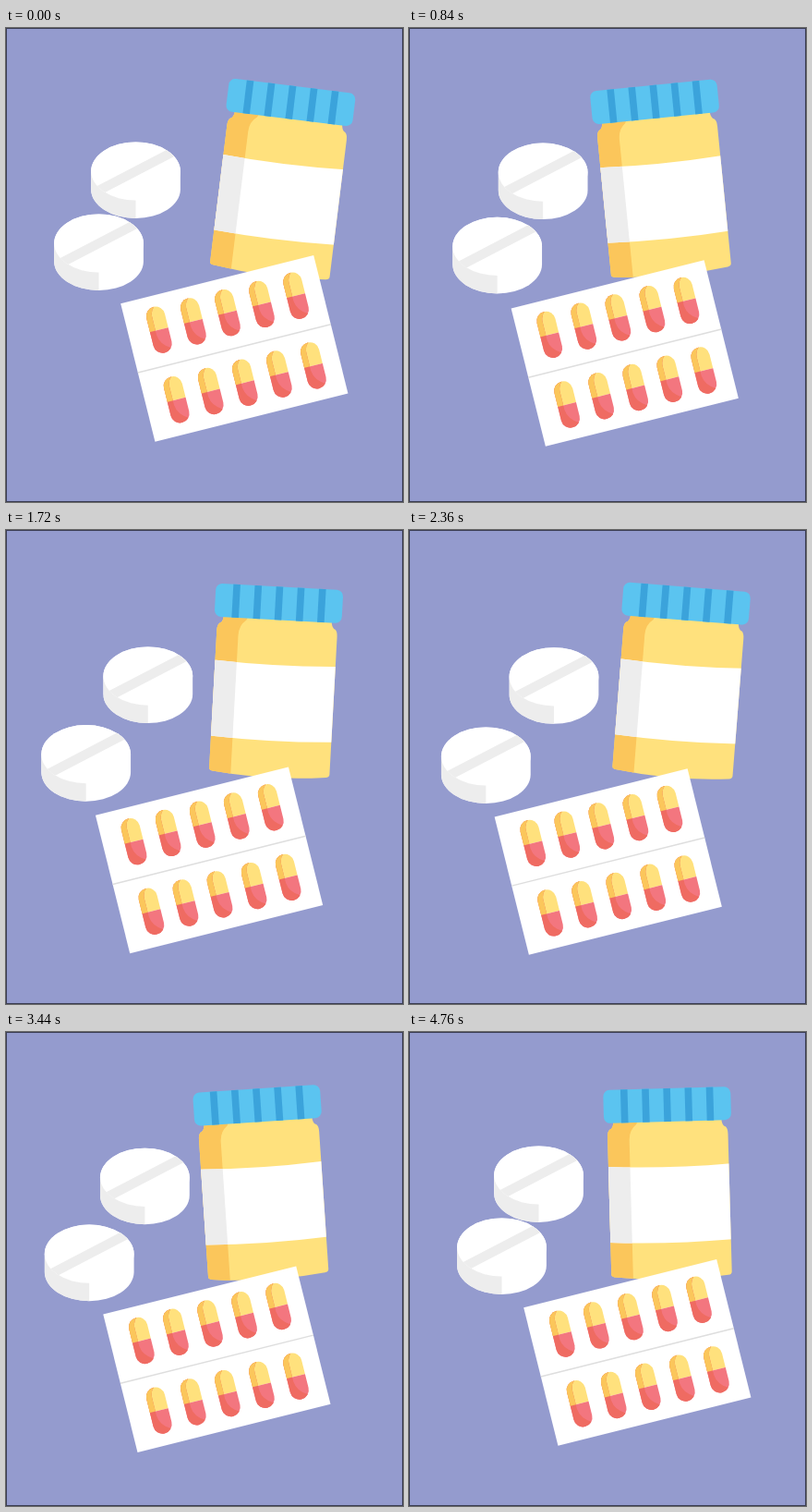
Animation, 430 px wide and 513 px high, one loop 4800 ms. Source, as an HTML page with a canvas:

```html
<!DOCTYPE html>
<html lang="en">
<head>
<meta charset="utf-8">
<title>Medicine</title>
<style>
  html, body { margin: 0; width: 100%; height: 100%; overflow: hidden; background: #949bce; }
  canvas { display: block; }
</style>
</head>
<body>
<canvas id="stage"></canvas>
<script>
const W = 430, H = 513, LOOP = 4800, STEP = 40, RAD = Math.PI / 180;
const canvas = document.getElementById('stage');
const ctx = canvas.getContext('2d');
const scale = window.devicePixelRatio || 1;
canvas.width = W * scale;
canvas.height = H * scale;
canvas.style.width = W + 'px';
canvas.style.height = H + 'px';

const C = {
  bg: '#949bce', border: '#3b3e55', white: '#ffffff', gray: '#ededed', line: '#dedede',
  cap: '#5bc4f0', stripe: '#3ba3db', yellow: '#ffe17d', amber: '#fbc65b',
  pink: '#f3767f', red: '#ef6b62'
};

const smooth = p => p * p * (3 - 2 * p);
const settle = p => p * (1 - p) ** 2 + 3 * (1 - p) * p * p + p ** 3;

// 0 -> 1 -> 0 over one loop
function backAndForth(t, easeOut) {
  const p = t / (LOOP / 2);
  return p < 1 ? easeOut(p) : 1 - smooth(p - 1);
}

function swing(t) {
  const half = 1040, n = Math.floor(t / half);
  const value = 1 - 2 * smooth(t / half - n);
  return 7.05 * RAD * (n % 2 ? -value : value);
}

function placed(x, y, angle, draw) {
  ctx.save();
  ctx.translate(x, y);
  ctx.rotate(angle);
  draw();
  ctx.restore();
}

function rect(color, x, y, w, h) {
  ctx.fillStyle = color;
  ctx.fillRect(x, y, w, h);
}

function fill(color, path) {
  ctx.fillStyle = color;
  ctx.beginPath();
  path();
  ctx.fill();
}

function clip(path) {
  ctx.beginPath();
  path();
  ctx.clip();
}

function bodyPath() {
  ctx.moveTo(-58, -175);
  ctx.lineTo(-58, -172);
  ctx.quadraticCurveTo(-59, -167, -62, -166);
  ctx.quadraticCurveTo(-64.5, -164, -64.5, -158);
  ctx.lineTo(-64.5, -9);
  ctx.quadraticCurveTo(-64.5, -7, -61, -6.2);
  ctx.quadraticCurveTo(1, 1.5, 62, -5.5);
  ctx.quadraticCurveTo(66, -6, 66, -9);
  ctx.lineTo(66, -158);
  ctx.quadraticCurveTo(66, -164, 63.5, -166);
  ctx.quadraticCurveTo(60.5, -167, 59.5, -172);
  ctx.lineTo(59.5, -175);
}

function labelPath() {
  ctx.moveTo(-66, -126);
  ctx.quadraticCurveTo(1, -122, 68, -126);
  ctx.lineTo(68, -44);
  ctx.quadraticCurveTo(1, -40, -66, -44);
}

function shadePath() {
  ctx.moveTo(-66, -176);
  ctx.lineTo(-31, -176);
  ctx.lineTo(-33, -171);
  ctx.quadraticCurveTo(-41, -165, -41, -154);
  ctx.lineTo(-41, 4);
  ctx.lineTo(-66, 4);
}

function drawBottle() {
  ctx.save();
  clip(bodyPath);
  rect(C.yellow, -70, -180, 140, 190);
  fill(C.amber, shadePath);
  fill(C.white, labelPath);
  clip(labelPath);
  fill(C.gray, shadePath);
  ctx.restore();

  ctx.save();
  clip(() => ctx.roundRect(-68, -209, 138, 36, 7));
  rect(C.cap, -70, -210, 142, 38);
  for (let k = -2; k <= 2; k++) rect(C.stripe, 1 + 23.2 * k - 3.8, -210, 7.6, 38);
  ctx.restore();
}

function drawTablet() {
  const rx = 48.4, ry = 31.6, depth = 19.4;
  const face = () => ctx.ellipse(0, 0, rx, ry, 0, 0, 2 * Math.PI);
  const solid = () => {
    ctx.ellipse(0, 0, rx, ry, 0, Math.PI, 2 * Math.PI);
    ctx.ellipse(0, depth, rx, ry, 0, 0, Math.PI);
  };
  fill(C.white, solid);
  ctx.save();
  clip(solid);
  rect(C.gray, -rx, 0, rx, depth + ry);
  ctx.restore();
  fill(C.white, face);
  clip(face);
  fill(C.gray, () => {
    ctx.moveTo(-50, 20.2);
    ctx.lineTo(41, -27.1);
    ctx.lineTo(50, -20.2);
    ctx.lineTo(-41, 27.1);
  });
}

function drawCapsule() {
  clip(() => ctx.roundRect(-10.2, -25.6, 20.4, 51.2, 10.2));
  rect(C.yellow, -11, -26, 22, 26);
  rect(C.pink, -11, 0, 22, 26);
  const shade = () => {
    ctx.moveTo(-11, -26);
    ctx.lineTo(1, -26);
    ctx.quadraticCurveTo(-4, -22, -4, -15);
    ctx.lineTo(-4, 5);
    ctx.quadraticCurveTo(-3, 16, 8, 22);
    ctx.lineTo(4, 27);
    ctx.lineTo(-11, 27);
  };
  fill(C.red, shade);
  clip(() => ctx.rect(-11, -26, 22, 26));
  fill(C.amber, shade);
}

function drawSheet() {
  const w = 215.4, h = 154;
  rect(C.white, 0, 0, w, h);
  rect(C.line, 0, h / 2 - 0.75, w, 1.5);
  for (const y of [37.7, 115.6])
    for (let k = 0; k < 5; k++) placed(33.5 + 38.2 * k, y, 0, drawCapsule);
}

function draw(t) {
  const drift = backAndForth(t, smooth);
  const slide = backAndForth(t, settle);
  ctx.setTransform(scale, 0, 0, scale, 0, 0);
  rect(C.bg, 0, 0, W, H);
  placed(284, 270, swing(t), drawBottle);
  placed(140.5 + 16.5 * drift, 155 + 3.8 * drift, 0, drawTablet);
  placed(100.5 - 17.2 * drift, 233 + 12 * drift, 0, drawTablet);
  placed(124.2 - 31.6 * slide, 298.2 + 12.2 * slide, -14 * RAD, drawSheet);
  ctx.strokeStyle = C.border;
  ctx.lineWidth = 1;
  ctx.strokeRect(0.5, 0.5, W - 1, H - 1);
}

const start = performance.now();
function tick() {
  const elapsed = Math.max(0, performance.now() - start) % LOOP;
  draw(Math.floor(elapsed / STEP) * STEP);
  requestAnimationFrame(tick);
}
tick();
</script>
</body>
</html>
```
